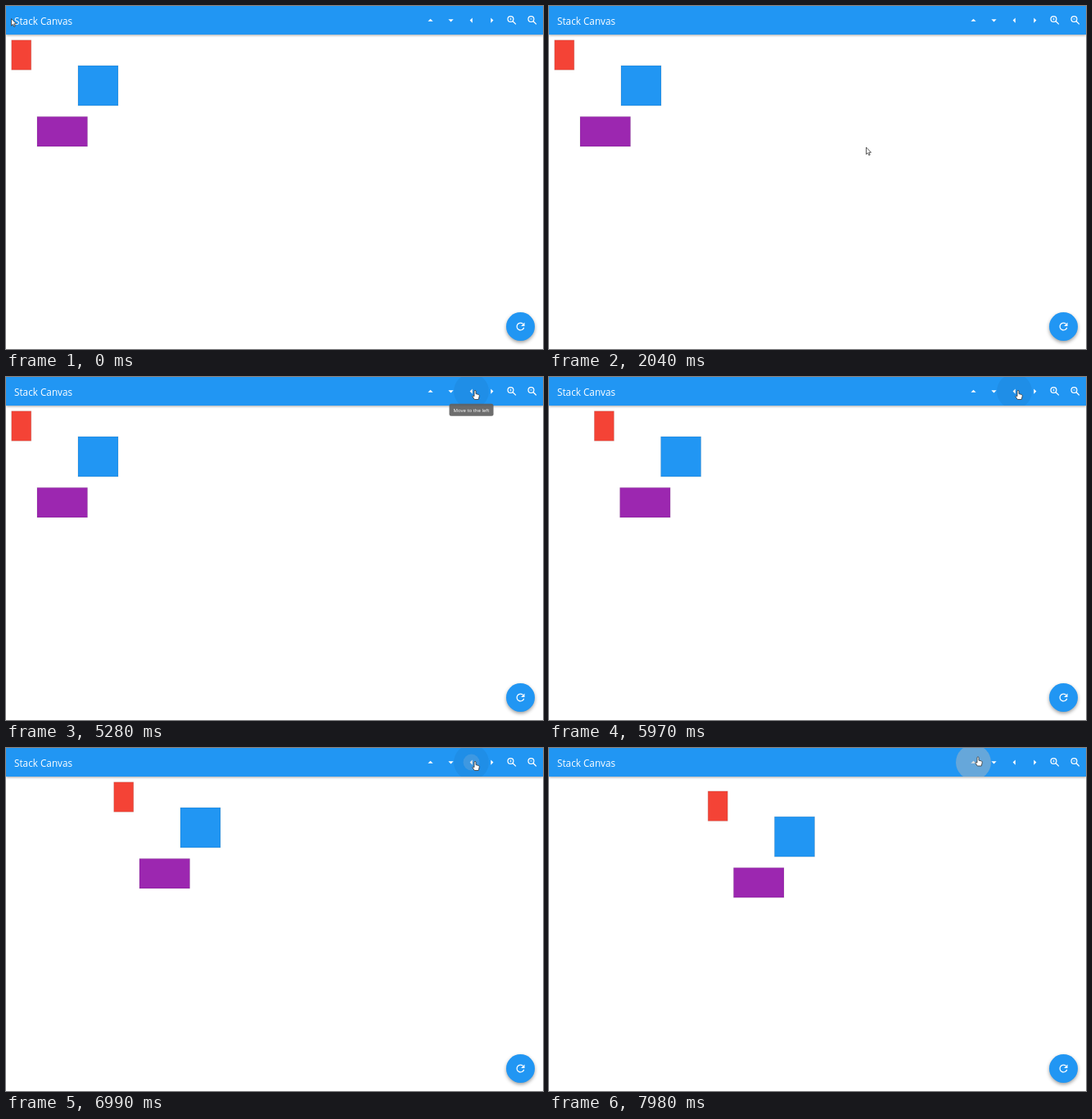
Animation of 656 by 420 pixels, one loop 8000 ms. Source, as an HTML page:

```html
<!DOCTYPE html>
<html lang="en">
<head>
<meta charset="utf-8">
<title>Stack Canvas</title>
<style>
  html, body { margin: 0; width: 100%; height: 100%; overflow: hidden; background: #fff; }
  svg { display: block; width: 656px; height: 420px; font-family: "Open Sans", "Noto Sans", sans-serif; }
  .bar { filter: drop-shadow(0 1.2px 1.5px rgba(0, 0, 0, .35)); }
  .fab { filter: drop-shadow(0 2px 2.2px rgba(0, 0, 0, .38)); }
  .line { fill: none; stroke: #fff; stroke-width: 2; }
  .cursor { fill: #fff; stroke: #333; stroke-width: .8; stroke-linejoin: round; }
  .shapes rect { stroke: rgba(0, 0, 0, .1); stroke-width: 1; }
</style>
</head>
<body>
<svg viewBox="0 0 656 420">
  <defs>
    <clipPath id="barClip"><rect width="656" height="35"/></clipPath>
    <g id="lens">
      <circle class="line" cx="9.5" cy="9.5" r="5.5"/>
      <path class="line" d="M13.6 13.6L19.75 19.75"/>
    </g>
  </defs>

  <g id="shapes" class="shapes">
    <rect x="6.75" y="41.75" width="24" height="36.5" fill="#f44336"/>
    <rect x="88" y="73" width="49" height="49" fill="#2196f3"/>
    <rect x="38" y="135.5" width="61.5" height="36.5" fill="#9c27b0"/>
  </g>

  <rect class="bar" width="656" height="35" fill="#2196f3"/>
  <text x="10" y="23" font-size="11.75" fill="#fff">Stack Canvas</text>

  <g id="icons" fill="#fff"></g>
  <g clip-path="url(#barClip)">
    <circle id="hover" cy="17.5" r="21.5"/>
    <circle id="splash" cy="17.5" fill="#c8c8c8"/>
  </g>

  <circle class="fab" cx="628.5" cy="392.5" r="17.5" fill="#2196f3"/>
  <g transform="translate(621 385) scale(.625)">
    <path class="line" d="M16.95 7.05A7 7 0 1 0 18.7 14"/>
    <path d="M20 4v7h-7z" fill="#fff"/>
  </g>

  <g id="tooltip">
    <rect x="541.5" y="32.7" width="54" height="15" rx="2.5" fill="#616161" fill-opacity=".92"/>
    <text x="568.5" y="42.6" font-size="6" fill="#fff" text-anchor="middle">Move to the left</text>
  </g>

  <path id="arrow" class="cursor" d="M0 0V8.6L2 6.8 3.3 9.8 4.7 9.2 3.4 6.3H6Z"/>
  <path id="hand" class="cursor" d="M-1 1Q0-.6 1 1V4.6L4.4 5.5Q5.4 5.9 5.2 7.6L4.2 11.5H-.7L-3.2 7.8Q-3.2 6.3-1 7.6Z"/>
</svg>
<script>
const LOOP = 8000, STEP = 62.5, MOVE_TIME = 500;
const BUTTONS = [518.5, 543.5, 568.5, 593.5, 618, 643];
const ICONS = [
  '<path d="M7 14l5-5 5 5z"/>',
  '<path d="M7 10l5 5 5-5z"/>',
  '<path d="M14 7l-5 5 5 5z"/>',
  '<path d="M10 17l5-5-5-5z"/>',
  '<use href="#lens"/><path d="M7 9h2V7h1v2h2v1h-2v2H9v-2H7z"/>',
  '<use href="#lens"/><path d="M7 9h5v1H7z"/>'
];
// Cursor stops: time, x, y
const PATH = [
  [900, 6.5, 15.5], [1950, 387.5, 173], [2350, 387.5, 173], [3500, 639.5, 78],
  [4250, 639.5, 78], [5060, 573, 16], [7480, 573, 16], [7760, 524, 10.5]
];
const CLICKS = [
  { at: 5582, hold: 90, dx: 1, dy: 0, x: BUTTONS[2] },
  { at: 6366, hold: 80, dx: 1, dy: 0, x: BUTTONS[2] },
  { at: 7112, hold: 280, dx: 1, dy: 0, x: BUTTONS[2] },
  { at: 7892, hold: 200, dx: 0, dy: 1, x: BUTTONS[0] }
];

const el = id => document.getElementById(id);
const clamp = v => Math.max(0, Math.min(1, v));
const smooth = v => v * v * (3 - 2 * v);
const place = (node, x, y) => node.setAttribute('transform', `translate(${x} ${y})`);
const set = (node, attrs) => Object.entries(attrs).forEach(([k, v]) => node.setAttribute(k, v));

el('icons').innerHTML = ICONS.map((icon, i) =>
  `<g transform="translate(${BUTTONS[i] - 7.5} 10) scale(.625)">${icon}</g>`).join('');

function cursorAt(t) {
  let [, x, y] = PATH[0];
  for (let i = 1; i < PATH.length; i++) {
    const [t0, x0, y0] = PATH[i - 1], [t1, x1, y1] = PATH[i];
    if (t < t0) break;
    const k = smooth(clamp((t - t0) / (t1 - t0)));
    x = x0 + (x1 - x0) * k;
    y = y0 + (y1 - y0) * k;
  }
  return { x, y };
}

function drawSplash(t) {
  const click = CLICKS.findLast(c => t >= c.at - 150);
  const grow = click ? clamp((t - click.at + 150) / 200) : 0;
  const fade = click ? 1 - clamp((t - click.at - click.hold) / 200) : 0;
  set(el('splash'), {
    cx: click ? click.x : 0, r: 8 + 13.5 * grow,
    opacity: .42 * clamp(grow * 3) * fade
  });
}

function draw(t) {
  let dx = 0, dy = 0;
  for (const c of CLICKS) {
    const moved = STEP * clamp((t - c.at) / MOVE_TIME);
    dx += c.dx * moved;
    dy += c.dy * moved;
  }
  place(el('shapes'), dx, dy);

  const { x, y } = cursorAt(t);
  const button = t > 4600 && y < 32 ? BUTTONS.find(b => Math.abs(b - x) < 12.5) : undefined;
  const pointing = button !== undefined;
  set(el('hover'), { cx: button ?? 0, opacity: pointing ? .05 : 0 });
  drawSplash(t);
  set(el('tooltip'), { opacity: clamp((t - 5000) / 150) * (1 - clamp((t - 5480) / 75)) });

  place(el('arrow'), x, y);
  place(el('hand'), x, y);
  set(el('arrow'), { opacity: pointing ? 0 : 1 });
  set(el('hand'), { opacity: pointing ? 1 : 0 });
}

const start = performance.now();
function tick() {
  draw((performance.now() - start) % LOOP);
  requestAnimationFrame(tick);
}
tick();
</script>
</body>
</html>
```
